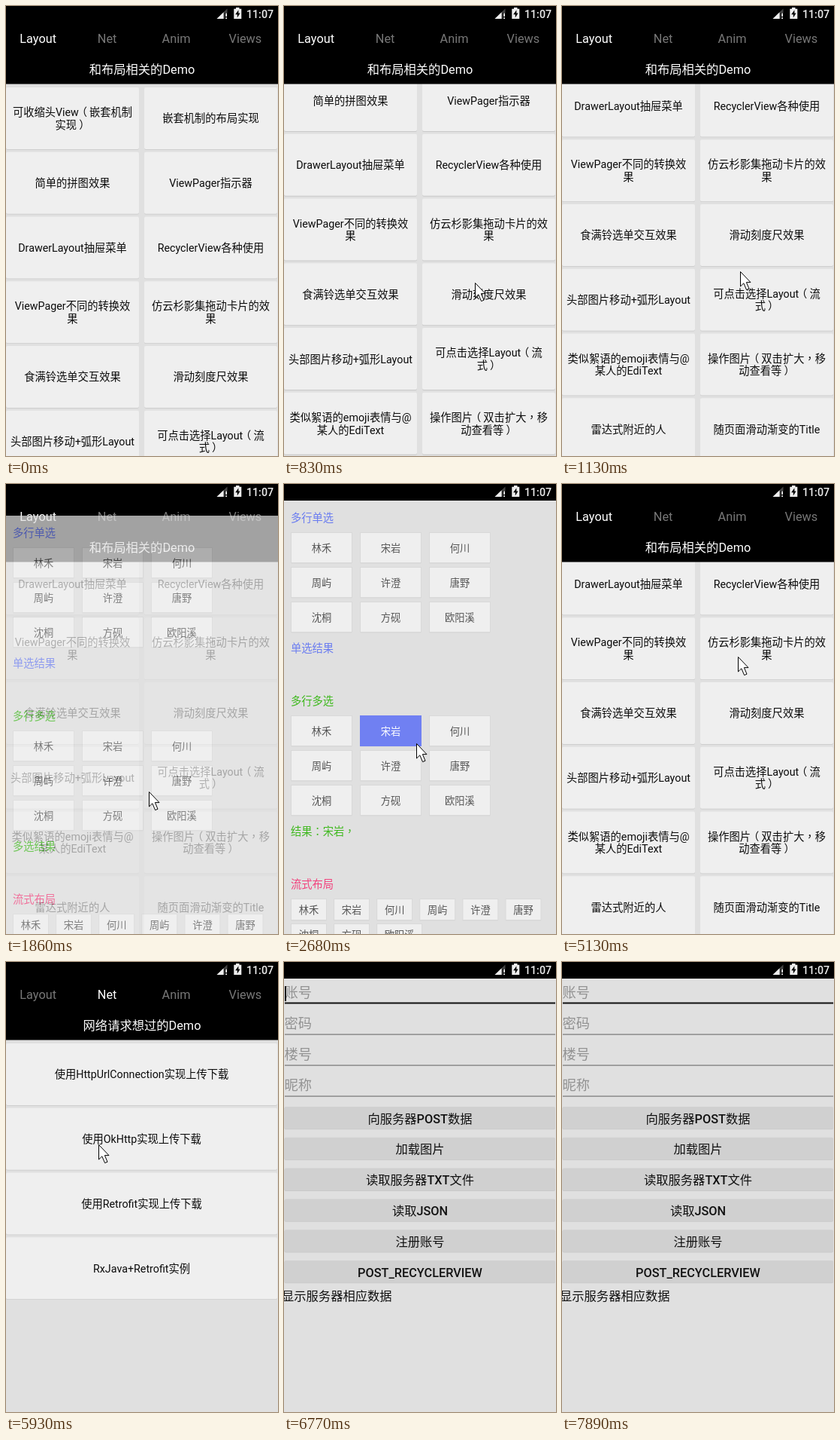
An HTML page for the animation above (7990 ms loop, 362 px wide and 597 px high).

```html
<!DOCTYPE html>
<html lang="zh-CN">
<head>
<meta charset="utf-8">
<title>Layout Demo</title>
<style>
html, body { margin: 0; width: 100%; height: 100%; overflow: hidden; background: #000; }
svg { display: block; width: 362px; height: 597px; font-family: Roboto, 'Noto Sans CJK SC', sans-serif; }
.mid { font-family: 'Noto Sans CJK TC', 'Noto Sans CJK SC', sans-serif; }
</style>
</head>
<body>
<svg id="stage" viewBox="0 0 362 597" xmlns="http://www.w3.org/2000/svg"></svg>
<script>
const LOOP = 7990, W = 362, H = 597, PITCH = 85.75;
const BG = '#e0e0e0', CARD = '#efefef', EDGE = '#d9d9d9', BLUE = '#7080f2';
const $ = id => document.getElementById(id);

// Full-width punctuation sits in the middle of its cell.
const nudge = (c, dx) => `<tspan dx="${dx}em">${c}</tspan><tspan dx="${-dx}em">\u200b</tspan>`;
const markup = s => s
  .replace(/[，：]/g, c => `<tspan class="mid" lang="zh-Hant">${c}</tspan>`)
  .replace(/（/g, c => nudge(c, -.22))
  .replace(/）/g, c => nudge(c, .22));

const text = (s, x, cy, size, fill, attrs = 'text-anchor="middle"') =>
  `<text x="${x}" y="${cy + size * .365}" font-size="${size}" fill="${fill}" ${attrs}>${markup(s)}</text>`;

const rect = (x, y, w, h, fill, attrs = '') =>
  `<rect x="${x}" y="${y}" width="${w}" height="${h}" fill="${fill}" ${attrs}/>`;

const raised = (x, y, w, h, fill, attrs = '') =>
  rect(x, y + .8, w, h, '#c9c9c9', 'rx="2"') + rect(x, y, w, h, fill, `rx="2" ${attrs}`);

const chip = (x, y, w, h, id = '') =>
  rect(x, y + .7, w, h, '#c9c9c9') + rect(x, y, w, h, CARD, `stroke="${EDGE}" ${id}`);

function card(label, x, w, row) {
  const cy = 149.2 + row * PITCH, lines = label.split('|');
  return raised(x, cy - 41.2, w, 82, CARD) + lines.map((line, i) =>
    text(line, x + w / 2, cy + (i - (lines.length - 1) / 2) * 16.6, 14.28, '#0c0c0c')).join('');
}

const layoutItems = [
  '可收缩头View（嵌套机制|实现）', '嵌套机制的布局实现',
  '简单的拼图效果', 'ViewPager指示器',
  'DrawerLayout抽屉菜单', 'RecyclerView各种使用',
  'ViewPager不同的转换效|果', '仿云杉影集拖动卡片的效|果',
  '食满铃选单交互效果', '滑动刻度尺效果',
  '头部图片移动+弧形Layout', '可点击选择Layout（流|式）',
  '类似絮语的emoji表情与@|某人的EdiText', '操作图片（双击扩大，移|动查看等）',
  '雷达式附近的人', '随页面滑动渐变的Title'
];
const netItems = ['使用HttpUrlConnection实现上传下载', '使用OkHttp实现上传下载',
  '使用Retrofit实现上传下载', 'RxJava+Retrofit实例'];
const names = ['林禾', '宋岩', '何川', '周屿', '许澄', '唐野', '沈桐', '方砚', '欧阳溪'];
const tabs = ['Layout', 'Net', 'Anim', 'Views'];

function pager() {
  const cards = layoutItems.map((s, i) => card(s, i % 2 ? 184 : 0, 177, i >> 1)).join('');
  const net = netItems.map((s, i) => card(s, 0, 361, i)).join('');
  return rect(0, 0, W, H, BG) +
    `<g id="pager"><g id="list">${cards}</g><g transform="translate(${W} 0)">${net}</g>` +
    rect(0, 0, W * 2, 103.5, '#000') +
    text('和布局相关的Demo', 181, 84, 16.3, '#fff') +
    text('网络请求想过的Demo', 181 + W, 84, 16.3, '#fff') + '</g>' +
    tabs.map((s, i) => text(s, 42.7 + i * 91.9, 43.3, 16.3, '#777', `id="tab${i}" text-anchor="middle"`)).join('');
}

function chipGrid(top, prefix) {
  return names.map((name, i) => {
    const x = 9.5 + i % 3 * 92, y = top + Math.floor(i / 3) * 46;
    return chip(x, y, 81, 40, `id="${prefix}${i}"`) +
      text(name, x + 40.5, y + 20.5, 13.25, '#555', `id="${prefix}t${i}" text-anchor="middle"`);
  }).join('');
}

function chooser() {
  const heading = (s, y, fill, id = '') => text(s, 9, y, 14.28, fill, id);
  const flow = names.map((name, i) => {
    const x = 9.5 + i % 6 * 57.1, y = 550.5 + Math.floor(i / 6) * 33, w = name.length > 2 ? 60 : 47;
    return chip(x, y, w, 28) + text(name, x + w / 2, y + 14.5, 13.25, '#555');
  }).join('');
  return rect(0, 22, W, H, BG) +
    heading('多行单选', 45, '#6a7cf0') + chipGrid(64.5, 'one') +
    heading('单选结果', 217.5, '#6a7cf0') +
    heading('多行多选', 288, '#3db81c') + chipGrid(307.5, 'many') +
    heading('多选结果', 461, '#3db81c', 'id="result"') +
    heading('流式布局', 531, '#f2407c') + flow;
}

function form() {
  const fields = ['账号', '密码', '楼号', '昵称'].map((s, i) => {
    const y = 40.3 + i * 41;
    return text(s, .5, y, 18.3, '#929292', '') +
      (i ? rect(1, y + 14.2, 360, 1.2, '#777') : rect(1, 53.5, 360, 2, '#111'));
  }).join('');
  const buttons = ['向服务器POST数据', '加载图片', '读取服务器TXT文件', '读取JSON', '注册账号', 'POST_RECYCLERVIEW']
    .map((s, i) => raised(.5, 192 + i * 40.8, 360.5, 29.5, '#d0d0d0') +
      text(s, 181, 207.7 + i * 40.8, 16.3, '#111', 'text-anchor="middle" font-weight="500"')).join('');
  return rect(0, 22, W, H, BG) + fields + buttons +
    text('显示服务器相应数据', -3, 443, 16.3, '#111', '') + rect(1, 32, 2, 20, '#111', 'id="caret"');
}

const statusBar = rect(0, 0, W, 22, '#000') +
  '<path d="M280.5 17L294.5 3.5V9H291V17Z" fill="#444"/>' +
  '<path d="M280.5 17L289.5 8.3V17Z" fill="#eee"/>' +
  '<path d="M292.2 9.5h1.8v4.6h-1.8zM292.2 15.2h1.8V17h-1.8z" fill="#eee"/>' +
  '<path d="M306 2h4.5v1.8h2.8V17h-10V3.8H306Z" fill="#eee"/>' +
  '<path d="M309.4 5.2L305.2 11.2H307.8V15.4L311.6 9.4H309.4Z" fill="#000"/>' +
  text('11:07', 338, 10.6, 14.28, '#eee', 'text-anchor="middle" font-weight="500"');

$('stage').innerHTML = pager() + `<g id="chooser">${chooser()}</g><g id="form">${form()}</g>` + statusBar +
  '<path id="pointer" d="M.5 .5V20L4.8 15.8L8.6 24.6L12 23.2L8.4 14.6H14Z" fill="#fff" stroke="#000"/>';

// Linear interpolation through [time, value, ...] stops.
function track(stops, t) {
  const i = stops.findIndex(s => s[0] > t);
  if (i < 0) return stops[stops.length - 1].slice(1);
  if (!i) return stops[0].slice(1);
  const a = stops[i - 1], b = stops[i], k = (t - a[0]) / (b[0] - a[0]);
  return a.slice(1).map((v, j) => v + (b[j + 1] - v) * k);
}

const pointerStops = [
  [0, 345, 620], [100, 343, 585], [400, 262, 500], [560, 254, 484], [730, 254, 432], [830, 254, 367],
  [880, 253, 345], [1050, 245, 342], [1600, 190, 408], [2050, 190, 408], [2420, 145, 330],
  [2600, 142, 328], [2800, 225, 368], [2880, 225, 372], [3010, 215, 620], [3430, 230, 620],
  [3530, 230, 570], [3900, 240, 160], [4000, 240, 149], [4400, 240, 149], [4950, 234, 229],
  [5180, 234, 229], [5420, 70, 236], [5750, 123, 242], [6480, 123, 242], [6670, 130, 553], [6770, 130, 620]
];
const scrollStops = [[560, 0], [730, 45], [830, 109], [930, 174], [1000, 184], [1130, 188]];

const clamp = v => Math.min(1, Math.max(0, v));
const SLIDE = 48;

function setWindow(id, t, opens, closes = Infinity) {
  const age = t - opens, leaving = t - closes;
  const visible = age >= 0 && leaving < 250;
  $(id).setAttribute('display', visible ? 'inline' : 'none');
  if (!visible) return;
  const entering = leaving < 0;
  const y = entering ? SLIDE * (1 - clamp(age / 350)) ** 5 : SLIDE * clamp(leaving / 250) ** 3;
  const alpha = entering ? 1 - (1 - clamp(age / 200)) ** 4 : 1 - clamp((leaving - 100) / 150);
  $(id).setAttribute('transform', `translate(0 ${Math.round(y)})`);
  $(id).setAttribute('opacity', alpha);
}

function setChip(i, on) {
  $('many' + i).setAttribute('fill', on ? BLUE : CARD);
  $('many' + i).setAttribute('stroke', on ? BLUE : EDGE);
  $('manyt' + i).setAttribute('fill', on ? '#fff' : '#555');
}

function pageShift(t) {
  if (t < 5420) return 164 * clamp((t - 5200) / 220);
  return W - (W - 164) * (1 - clamp((t - 5420) / 400)) ** 5;
}

function render(t) {
  const [px, py] = track(pointerStops, t);
  $('pointer').setAttribute('transform', `translate(${Math.round(px)} ${Math.round(py)})`);
  $('list').setAttribute('transform', `translate(0 ${-track(scrollStops, t)[0]})`);
  $('pager').setAttribute('transform', `translate(${-pageShift(t)} 0)`);
  const active = t < 5430 ? 0 : 1;
  tabs.forEach((_, i) => $('tab' + i).setAttribute('fill', i === active ? '#fff' : '#777'));

  setWindow('chooser', t, 1806, 4080);
  setWindow('form', t, 6480);

  const picked = [[1, 2560], [5, 2840]].filter(([i, at]) => {
    setChip(i, t >= at);
    return t >= at;
  });
  $('result').innerHTML = markup(picked.length
    ? '结果：' + picked.map(([i]) => names[i] + '，').join('') : '多选结果');

  const caretOn = t < 6870 || (t >= 7370 && t < 7880);
  $('caret').setAttribute('display', caretOn ? 'inline' : 'none');
}

const start = performance.now();
function frame() {
  render((performance.now() - start) % LOOP);
  requestAnimationFrame(frame);
}
frame();
</script>
</body>
</html>
```
